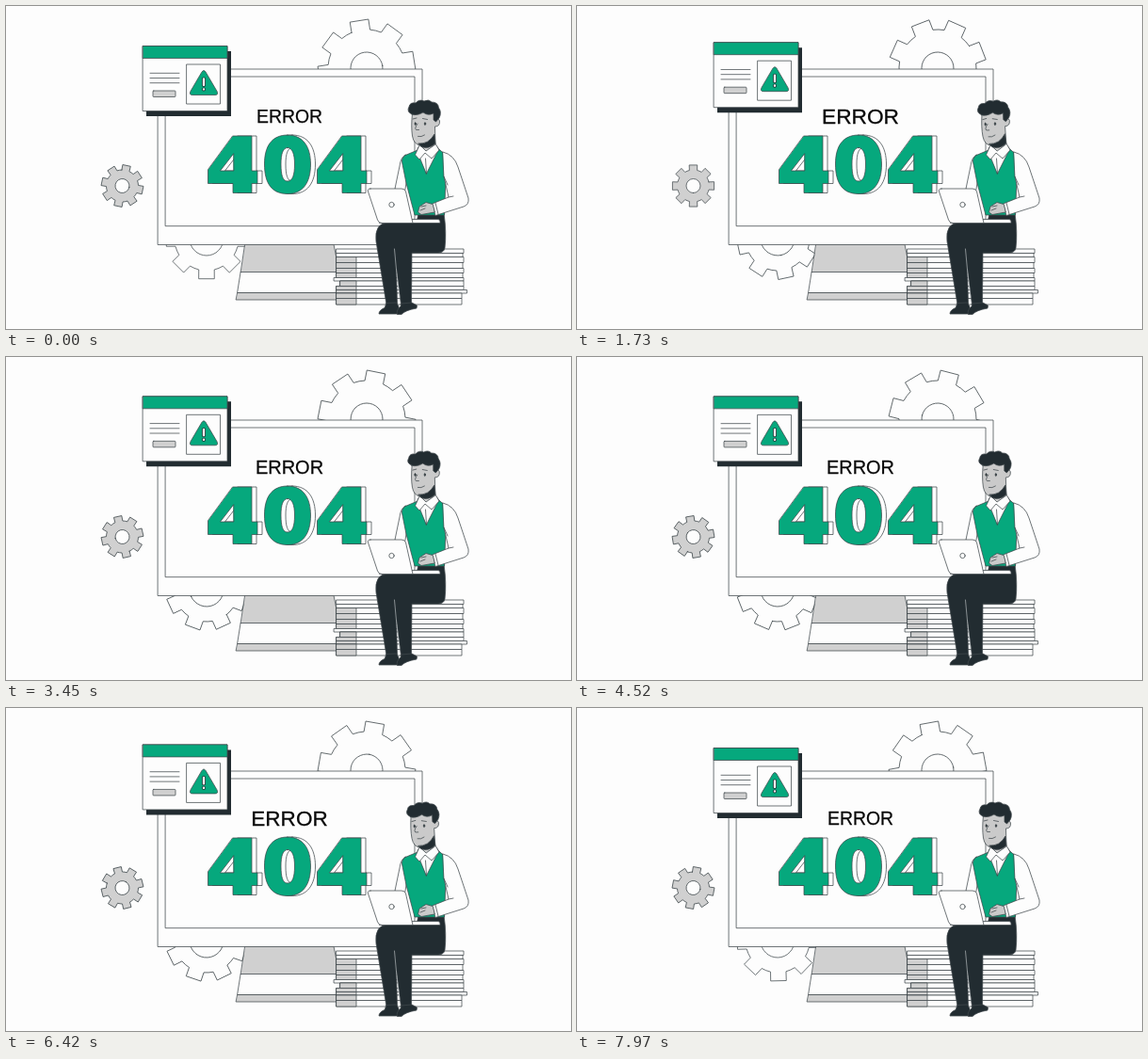
An HTML page for the animation above (8 s loop, 600 px wide and 343 px high).

```html
<!DOCTYPE html>
<html lang="en">
<head>
<meta charset="utf-8">
<title>Error 404</title>
<style>
  html, body { margin: 0; width: 100%; height: 100%; overflow: hidden; background: #fdfdfd; }
  svg { display: block; width: 600px; height: 343px; }
  .line { stroke: #40494d; stroke-width: .75; stroke-linejoin: round; stroke-linecap: round; }
  .white { fill: #fdfdfd; }
  .grey { fill: #d0d0d0; }
  .green { fill: #06a87d; }
  .dark { fill: #222c31; }
  .skin { fill: #cacaca; }
  .none { fill: none; }
  .error { font: 19.4px "Liberation Sans", Arial, sans-serif; text-anchor: middle; fill: #080808; stroke: #080808; stroke-width: .25; }
</style>
</head>
<body>
<svg viewBox="0 0 600 343">
  <defs>
    <path id="four" fill-rule="evenodd" d="M241 138H261V175H267V188.500H261V198.500H241V188.500H214.500V174ZM241.500 157L227.500 175H241.500Z"/>
    <path id="zero" fill-rule="evenodd" d="M299 137C316 137 323.500 150 323.500 168C323.500 188 315 199.500 299 199.500C282 199.500 274.500 188 274.500 168C274.500 149 282 137 299 137ZM299 150.500C294 150.500 292 157 292 168C292 180 294 186 299 186C304 186 306.500 180 306.500 168C306.500 157 304 150.500 299 150.500Z"/>
    <g id="digits">
      <use href="#four"/><use href="#zero"/><use href="#four" x="116"/>
    </g>
  </defs>

  <g class="line">
    <g id="topGear" class="white"></g>
    <g id="lowGear" class="white"></g>
    <g id="sideGear" class="grey"></g>

    <!-- stand and monitor -->
    <path class="grey" d="M254 253H348L354 283H249.500Z"/>
    <path class="white" d="M249.500 282.500H360V304.500H246Z"/>
    <path class="grey" d="M246 304.500H360V312H244.500Z"/>
    <rect class="white" x="161.500" y="67" width="280.500" height="186.500"/>
    <rect class="white" x="169.500" y="75" width="264.500" height="158.700"/>
  </g>

  <g class="line" role="img" aria-label="404">
    <use href="#digits" x="5" class="white"/>
    <use href="#digits" class="green"/>
  </g>
  <g id="label"><text class="error" x="0" y="6.700">ERROR</text></g>

  <g id="popup">
    <path class="dark" d="M149 48H239V117H149Z"/>
    <g class="line">
      <path class="white" d="M145.500 42.500H235V111.500H145.500Z"/>
      <path class="green" d="M145.500 42.500H235V55.500H145.500Z"/>
      <path class="none" d="M153 71.300H184M153 76.500H184M153 81.700H184"/>
      <rect class="grey" x="156" y="90" width="24" height="6.500" rx=".8"/>
      <rect class="white" x="192" y="62" width="35.500" height="42"/>
      <path class="green" d="M208 70Q210 67 212 70L224 90.500Q226 94.500 222 94.500H198Q194 94.500 196 90.500Z"/>
    </g>
    <path d="M210 77.500V84M210 88.300V88.600" fill="none" stroke="#222c31" stroke-width="3.800" stroke-linecap="round"/>
    <path d="M210 77.500V84M210 88.300V88.600" fill="none" stroke="#fdfdfd" stroke-width="2.300" stroke-linecap="round"/>
  </g>

  <g id="books" class="line"></g>

  <!-- seated man -->
  <g class="line">
    <path class="white" d="M424 158Q419 161 418 170L413 194L423 200L428 170Z"/>
    <path class="dark" d="M405 230H436L438 220H465Q468 240 466 257Q465 262 459 262H431L430.500 317H419.500L414.500 279L415.500 317H404L393 250Q391 231 405 230Z"/>
    <path class="none" style="stroke:#cfd3d5;stroke-width:.6" d="M412.500 258L414.500 280L418 310"/>
    <path class="dark" d="M404 315.500L414.500 315L417 319V327H396Q396 323 402 320.500Z"/>
    <path class="dark" d="M419.500 316L431 315L436.500 318L436 321Q424 323 420 327.500H415.500Q414 323 419 319Z"/>
    <path class="white" d="M438 150L456 147L462 155L447 185L435 160Z"/>
    <path class="green" d="M436 153.500L424 158.500Q419 162 421 168L425 188L434 222H465.500L467 183V158L459.500 152L446.500 178Z"/>
    <path class="none" d="M445.500 162L446.500 178"/>
    <path class="white" d="M439 148L434.500 158L439 163L445 156L452 162L460 153L456 146Z"/>
    <path class="white" d="M464 155Q476 158 480 171L491 204Q492 211 486 213L456 222.500L452.500 210L470 203L465 181Z"/>
    <path class="none" d="M465 181L469 190M470 203L475 202M456 209L459 221"/>
    <path class="skin" d="M453 210.500L446 208.500L439 213L437.500 219L441 221.500L455 219Z"/>
    <path class="none" d="M441 213L446 212M440 217L445 215"/>

    <g id="head">
      <path class="skin" d="M431.500 114Q430 128 431.500 138Q433 147 440 148L446 154L456 147L455.500 128Q461 128 460.500 122Q459 118 455.500 121V112L440 108Z"/>
      <path class="dark" d="M438 146Q449 147 455 136L456 146Q449 152.500 441 149.500Z"/>
      <path class="dark" d="M431 115Q425 112 428 107Q429 102 435 103Q439 98.500 444 101Q449 98.500 452 102Q459 102 459.500 108Q463 113 460 119L456.500 123L454 121V114Q448 117 443 113Q436 117 431 115Z"/>
      <path class="none" d="M437 125Q433.500 130 435.500 131.500L438.500 131.500M432 120L436 119M442.500 119.500L447.500 120.500M437.500 138.500Q441 139.500 444.500 137"/>
      <ellipse class="dark" cx="434.700" cy="125" rx=".7" ry="1.500"/>
      <ellipse class="dark" cx="445" cy="125" rx=".7" ry="1.500"/>
    </g>

    <!-- laptop -->
    <path class="white" d="M397 226.500H459Q461.500 227 461 230.500H397Z"/>
    <path class="white" d="M387 194H420Q423.500 194 424.500 197L432 230.500H399Q395.500 230.500 394.500 227L384.500 197Q383.500 194 387 194Z"/>
    <circle class="white" cx="409.500" cy="211" r="2.700"/>
  </g>
</svg>
<script>
const byId = id => document.getElementById(id);

// Closed gear outline around the origin, first tooth pointing up.
function gearPath(tip, root, hole) {
  const at = (r, deg) => {
    const a = deg * Math.PI / 180;
    return (r * Math.sin(a)).toFixed(2) + ' ' + (-r * Math.cos(a)).toFixed(2);
  };
  let d = 'M' + at(root, -14);
  for (let a = 0; a < 360; a += 45) {
    d += `L${at(tip, a - 11)}L${at(tip, a + 11)}L${at(root, a + 14)}`;
    d += `A${root} ${root} 0 0 1 ${at(root, a + 31)}`;
  }
  return d + `ZM${hole} 0A${hole} ${hole} 0 1 0 ${-hole} 0A${hole} ${hole} 0 1 0 ${hole} 0Z`;
}

// centre, radii (tip, root, hole) and starting angle
const gears = [
  { id: 'topGear', x: 383, y: 66, radii: [52, 41, 17], start: -9 },
  { id: 'lowGear', x: 213, y: 247, radii: [43.500, 34, 18], start: 0 },
  { id: 'sideGear', x: 123.500, y: 191, radii: [22.500, 17, 7.500], start: 12 }
];
for (const g of gears) {
  g.el = byId(g.id);
  g.el.innerHTML = `<path fill-rule="evenodd" d="${gearPath(...g.radii)}"/>`;
}

// left, right, top, height of each layer of the pile
const layers = [
  [351, 486, 258, 4.500], [351, 485, 262.500, 4], [351, 486, 266.500, 6],
  [351, 485, 272.500, 6], [351, 486, 278.500, 5], [351, 485, 283.500, 5],
  [348.500, 486, 288.500, 3.500], [355, 486, 292, 5.500], [351, 486, 297.500, 4],
  [351, 489.500, 301.500, 3.500], [351, 484, 305, 5.500], [351, 484, 310.500, 6.500]
];
byId('books').innerHTML = layers.map(([l, r, y, h], i) =>
  `<rect class="white" x="${l}" y="${y}" width="${r - l}" height="${h}"/>` +
  (i > 1 && i !== 6 ? `<rect class="grey" x="${l}" y="${y}" width="${372 - l}" height="${h}"/>` : '')
).join('');

const label = byId('label'), popup = byId('popup'), head = byId('head');

function draw(now) {
  const t = now % 8000;
  const pulse = (1 - Math.cos(t / 4000 * 2 * Math.PI)) / 2;
  for (const g of gears) {
    g.el.setAttribute('transform', `translate(${g.x} ${g.y}) rotate(${g.start + t * 360 / 8000})`);
  }
  label.setAttribute('transform', `translate(301 117.500) scale(${1 + .18 * pulse})`);
  popup.setAttribute('transform', `translate(0 ${-4 * pulse})`);
  head.setAttribute('transform', `rotate(${-2.500 * pulse} 447 150)`);
}

const begin = performance.now();
function tick() {
  draw(performance.now() - begin);
  requestAnimationFrame(tick);
}
tick();
</script>
</body>
</html>
```
